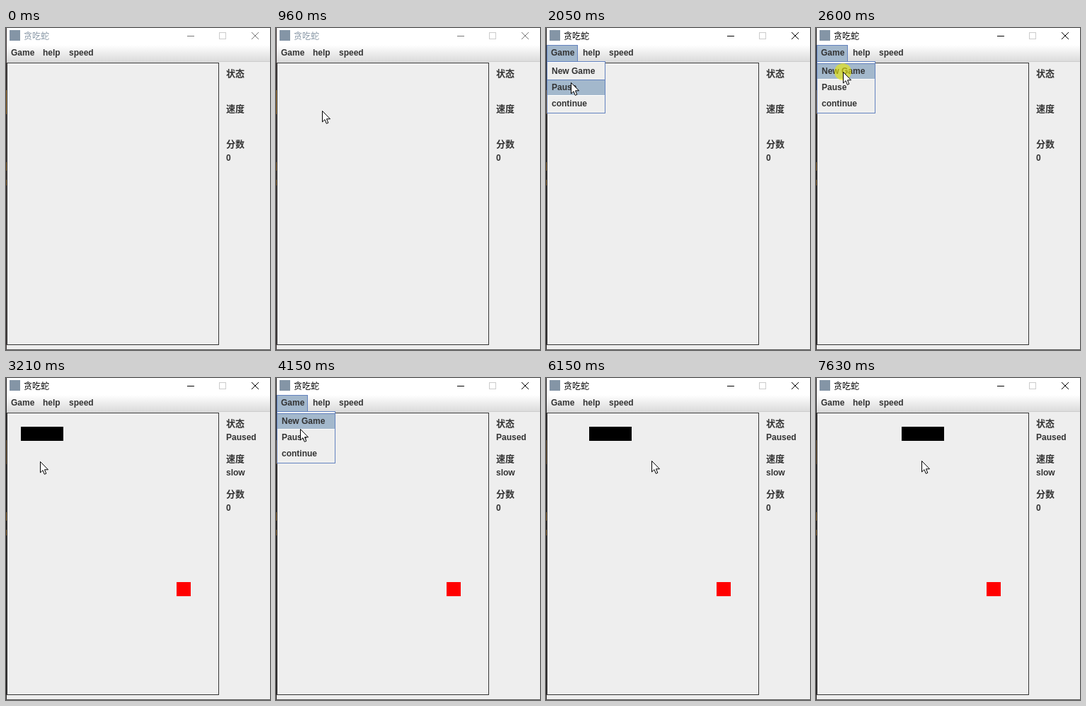
An HTML page with a canvas that plays this animation: 373x456 px, repeating every 8000 ms.

```html
<!DOCTYPE html>
<html lang="zh-CN">
<head>
<meta charset="utf-8">
<style>
  html, body { margin: 0; width: 100%; height: 100%; overflow: hidden; background: #eee; }
  canvas { display: block; }
</style>
</head>
<body>
<canvas width="373" height="456"></canvas>
<script>
const ctx = document.querySelector('canvas').getContext('2d');
const LOOP = 8000;
const LATIN = 'bold 12px "Liberation Sans", Arial, sans-serif';
const CJK = '"Noto Sans CJK SC", "Noto Sans CJK", sans-serif';
const BLUE = '#6382bf', PICK = '#a3b8cc';
const ITEMS = ['New Game', 'Pause', 'continue'];
const ROW = 23, FIRST_ROW = 50;

// Pointer moves: first step, last step, number of steps, end point
const START = [150, 294];
const MOVES = [
  [580, 1120, 8, 25, 35],
  [1820, 2050, 4, 35, 77],
  [2200, 2430, 4, 38, 62],
  [2910, 3210, 5, 48, 118],
  [3290, 3520, 4, 30, 33],
  [3830, 4150, 5, 34, 72],
  [4220, 4300, 2, 35, 78],
  [4450, 4680, 4, 37, 102],
  [5690, 5920, 4, 149, 117]
];
const CLICKS = [1420, 2600, 3670, 5460];
const OPEN = [[1500, 2680], [3750, 5540]];
const TICKS = [5690, 6150, 6620, 7160, 7630];
const ACTIVE = 1420, GAME = 2680;

const ARROW = new Path2D('M.5 .5V16L4 12.7L6.3 18.3L8.8 17.3L6.5 11.8H11.5Z');

function rect(x, y, w, h, color) {
  ctx.fillStyle = color;
  ctx.fillRect(x, y, w, h);
}

function frame(x, y, w, h, color) {
  ctx.strokeStyle = color;
  ctx.lineWidth = 1;
  ctx.strokeRect(x + .5, y + .5, w - 1, h - 1);
}

function text(str, x, y, font = LATIN, color = '#333') {
  ctx.font = font;
  ctx.fillStyle = color;
  ctx.fillText(str, x, y);
}

function pointer(t) {
  let [x, y] = START;
  for (const [from, to, steps, endX, endY] of MOVES) {
    if (t < from) break;
    const step = Math.floor((t - from) / (to - from) * (steps - 1) + .01) + 1;
    const p = Math.min(1, step / steps);
    const e = p * p * (3 - 2 * p);
    x += (endX - x) * e;
    y += (endY - y) * e;
  }
  return [Math.round(x), Math.round(y)];
}

function drawWindow(active) {
  rect(0, 0, 373, 456, '#eee');
  rect(1, 0, 372, 24, '#fff');
  rect(5, 3, 15, 15, '#8495a6');
  text('贪吃蛇', 25, 16, '12px ' + CJK, active ? '#000' : '#8796a5');

  const ink = active ? '#000' : '#777';
  rect(256, 11, 10, 1, ink);
  frame(301, 6, 10, 10, '#ccc');
  ctx.strokeStyle = ink;
  ctx.beginPath();
  ctx.moveTo(347, 6); ctx.lineTo(357, 16);
  ctx.moveTo(357, 6); ctx.lineTo(347, 16);
  ctx.stroke();

  const bar = ctx.createLinearGradient(0, 24, 0, 48);
  bar.addColorStop(0, '#fff');
  bar.addColorStop(1, '#dadada');
  rect(1, 24, 372, 24, bar);
  rect(1, 47, 372, 1, '#ccc');

  // Sliver of the desktop beside and below the window
  rect(0, 0, 1, 456, active ? '#2b2829' : '#43383a');
  rect(0, 88, 1, 34, active ? '#6b5030' : '#a97a38');
  rect(0, 190, 1, 12, '#8a6430');
  rect(0, 215, 1, 8, '#8a6430');
  rect(0, 455, 373, 1, '#555');

  frame(1, 49, 300, 400, '#333');
}

function drawMenuBar(open) {
  if (open) {
    rect(1, 24, 44, 23, PICK);
    rect(1, 24, 44, 1, BLUE);
    rect(1, 24, 1, 23, BLUE);
    rect(44, 24, 1, 23, BLUE);
  }
  text('Game', 7, 39);
  text('help', 52, 39);
  text('speed', 89, 39);
}

function drawPopup(x, y) {
  rect(1, 47, 83, 74, '#eee');
  frame(1, 47, 83, 74, BLUE);
  rect(2, 48, 81, 1, '#fff');
  ITEMS.forEach((item, i) => {
    const top = FIRST_ROW + i * ROW;
    if (y >= top && y < top + ROW) {
      rect(2, top, 81, ROW, PICK);
      rect(2, top, 81, 1, BLUE);
      rect(2, top + ROW - 1, 81, 1, '#fff');
    }
    text(item, 8, top + 15);
  });
}

function drawStatus(playing) {
  const values = playing ? ['Paused', 'slow', '0'] : ['', '', '0'];
  ['状态', '速度', '分数'].forEach((label, i) => {
    text(label, 311, 69 + i * 50, 'bold 13px ' + CJK);
    text(values[i], 311, 88 + i * 50);
  });
}

function drawPointer(x, y, clicked) {
  if (clicked) {
    ctx.fillStyle = 'rgba(240,235,0,.6)';
    ctx.beginPath();
    ctx.arc(x, y, 12, 0, Math.PI * 2);
    ctx.fill();
  }
  ctx.save();
  ctx.translate(x, y);
  ctx.fillStyle = '#fff';
  ctx.strokeStyle = '#000';
  ctx.fill(ARROW);
  ctx.stroke(ARROW);
  ctx.restore();
}

function draw(t) {
  const [x, y] = pointer(t);
  const open = OPEN.some(([from, to]) => t >= from && t < to);
  const playing = t >= GAME;
  drawWindow(t >= ACTIVE);
  drawStatus(playing);
  if (playing) {
    const moved = TICKS.filter(tick => t >= tick).length;
    rect(21 + moved * 20, 69, 60, 20, '#000');
    rect(241, 289, 20, 20, '#f00');
  }
  drawMenuBar(open);
  if (open) drawPopup(x, y);
  if (t >= MOVES[0][0]) drawPointer(x, y, CLICKS.some(c => t >= c && t < c + 80));
}

const began = performance.now();
function tick() {
  draw((performance.now() - began) % LOOP);
  requestAnimationFrame(tick);
}
tick();
</script>
</body>
</html>
```
